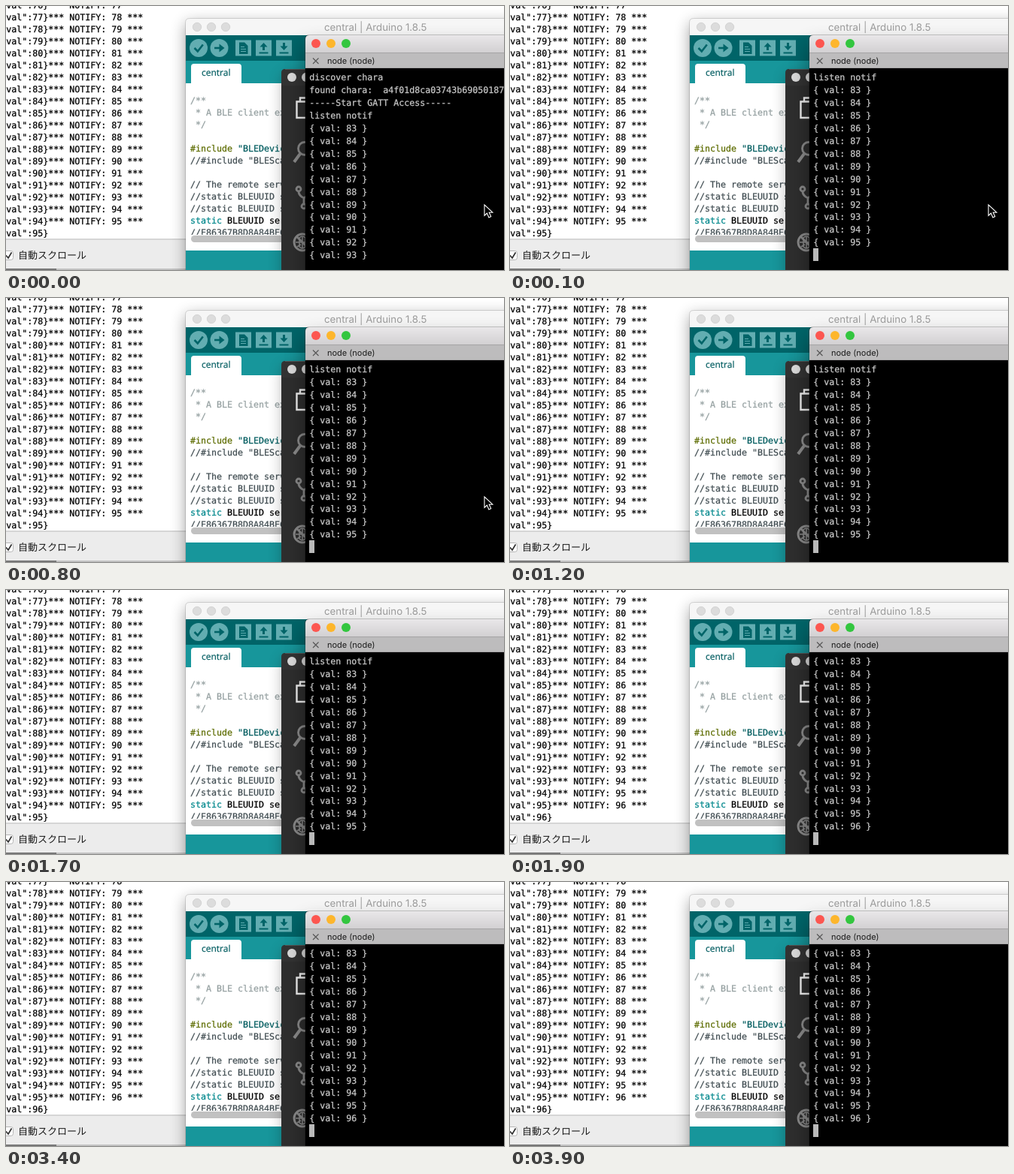
Recreate the animation shown at these times as an HTML page. Size 662 by 352 pixels, loop 4 s.

```html
<!DOCTYPE html>
<html lang="ja">
<head>
<meta charset="utf-8">
<title>BLE notify demo</title>
<style>
html, body { margin: 0; width: 100%; height: 100%; overflow: hidden; background: #fff; }
svg { display: block; }
text { white-space: pre; text-rendering: geometricPrecision; }
.mono { font: 11.63px "DejaVu Sans Mono", monospace; stroke-width: .25; }
.ui { font-family: Inter, sans-serif; }
</style>
</head>
<body>
<svg width="662" height="352" viewBox="0 0 662 352">
  <defs>
    <linearGradient id="bar" x2="0" y2="1">
      <stop stop-color="#e9e7e9"/><stop offset="1" stop-color="#d2d0d2"/>
    </linearGradient>
    <filter id="soft" x="-20%" y="-20%" width="140%" height="140%"><feGaussianBlur stdDeviation="10"/></filter>
    <filter id="deep" x="-30%" y="-30%" width="160%" height="160%"><feGaussianBlur stdDeviation="14"/></filter>
    <clipPath id="page"><rect x="239" y="103" width="127" height="202"/></clipPath>
    <clipPath id="side"><rect x="366" y="84" width="32" height="268"/></clipPath>
  </defs>

  <!-- serial monitor -->
  <rect width="662" height="352" fill="#fff"/>
  <g id="log" class="mono" fill="#000" stroke="#000"></g>
  <rect y="310" width="240" height="42" fill="#ececec"/>
  <path d="M0 311H240" stroke="#c0c0c0"/>
  <rect x="-3.500" y="326.500" width="13" height="12" rx="3" fill="#fff" stroke="#b5b5b5"/>
  <path d="M0 332.500L3 336L7.500 328.500" fill="none" stroke="#333" stroke-width="1.700"/>
  <text x="16" y="337" font-size="13" fill="#1c1c1c" font-family="'Noto Sans CJK JP','Noto Sans CJK',sans-serif">自動スクロール</text>
  <rect y="350" width="240" height="2" fill="#c2c2c2"/>
  <rect y="350" width="67" height="2" fill="#777"/>

  <!-- editor window -->
  <rect x="239" y="23" width="440" height="345" fill="#000" opacity=".38" filter="url(#soft)"/>
  <path d="M239 352V22q0-5 5-5H662V352z" fill="#f6f6f6"/>
  <path d="M238.500 352V22q0-5.500 5.500-5.500H662" fill="none" stroke="#000" stroke-opacity=".12"/>
  <g fill="#dcdcdc" stroke="#cacaca" stroke-width=".7">
    <circle cx="254" cy="28" r="5.700"/><circle cx="273" cy="28" r="5.700"/><circle cx="292" cy="28" r="5.700"/>
  </g>
  <text class="ui" x="423" y="33" font-size="13.300" fill="#9c9c9c">central | Arduino 1.8.5</text>
  <rect x="239" y="39" width="423" height="34" fill="#006468"/>
  <g fill="#62adb1">
    <circle cx="256" cy="56" r="12"/><circle cx="283.500" cy="56" r="12"/>
    <path d="M305 45.500h21v21h-21zM332 45.500h21v21h-21zM359 45.500h21v21h-21z"/>
  </g>
  <g fill="none" stroke="#006468" stroke-width="2.600">
    <path d="M250.500 56l4.300 4.500l7-9"/>
    <path d="M277 56h8"/>
  </g>
  <g fill="#006468">
    <path d="M283.500 50.500l7 5.500l-7 5.500z"/>
    <path d="M310 48.500h7l4.500 4.500v11h-11.500z"/>
    <path d="M341 59v-4.500h-3.500l5-5.500l5 5.500h-3.500v4.500zM336.500 61.500h12v2h-12z"/>
    <path d="M368 49v4.500h-3.500l5 5.500l5-5.500h-3.500v-4.500zM363.500 61.500h12v2h-12z"/>
  </g>
  <path d="M312 54.500h5M312 57.500h7M312 60.500h7" stroke="#62adb1"/>
  <rect x="239" y="73" width="423" height="30" fill="#17969b"/>
  <path d="M246 103V81q0-4 4-4H309q4 0 4 4V103z" fill="#fff"/>
  <text x="260" y="93" font-size="12" fill="#005c60" stroke="#005c60" stroke-width=".2" font-family="'Open Sans',sans-serif">central</text>
  <rect x="239" y="103" width="130" height="223" fill="#fff"/>
  <g id="code" class="mono" clip-path="url(#page)"></g>
  <rect x="246" y="306" width="140" height="9" rx="4.500" fill="#c1c1c1"/>
  <rect x="239" y="326" width="130" height="26" fill="#17969b"/>

  <!-- dark editor edge -->
  <rect x="368" y="92" width="300" height="300" fill="#000" opacity=".3" filter="url(#soft)"/>
  <path d="M366 352V89q0-5 5-5H400V352z" fill="#333"/>
  <path d="M371 84.500H398" stroke="#555"/>
  <g clip-path="url(#side)">
    <rect x="366" y="106" width="32" height="246" fill="#2e2e2e"/>
    <circle cx="380" cy="95" r="6" fill="#dadada"/><circle cx="399" cy="95" r="6" fill="#dadada"/>
    <path d="M399 127.500H386.500V149H399M391 127v-4.500h8" fill="none" stroke="#f0f0f0" stroke-width="2.400"/>
    <g fill="none" stroke="#8a8a8a" stroke-width="2.800">
      <circle cx="397" cy="190" r="8.500"/><path d="M391 197L383 208" stroke-width="4"/>
      <circle cx="389" cy="244" r="3"/><circle cx="396" cy="267" r="3"/>
      <path d="M389 247q0 6 7 9v8M396 256q6-3 7-9"/>
      <circle cx="394" cy="315" r="11"/><path d="M386 307L402 323"/>
      <path d="M390 309q4-4 8 0v12q-4 4-8 0zM385 315h14M387 321l5-3M394 308v15" stroke-width="1.500"/>
    </g>
  </g>

  <!-- terminal -->
  <rect x="398" y="54" width="300" height="330" fill="#000" opacity=".42" filter="url(#deep)"/>
  <path d="M398 352V44q0-5 5-5H662V352z" fill="#000"/>
  <path d="M398 62V44q0-5 5-5H662V62z" fill="url(#bar)"/>
  <path d="M397.500 352V44q0-5.500 5.500-5.500H662" fill="none" stroke="#000" stroke-opacity=".2"/>
  <circle cx="412" cy="50" r="6" fill="#fc5650"/>
  <circle cx="432" cy="50" r="6" fill="#fdb62c"/>
  <circle cx="452" cy="50" r="6" fill="#33c63f"/>
  <rect x="398" y="62" width="264" height="21" fill="#bdbcbd"/>
  <path d="M398 62.500H662M398 82.500H662" stroke="#a5a4a5"/>
  <path d="M408 69.500l7.500 7.500m0-7.500l-7.500 7.500" stroke="#555" stroke-width="1.100"/>
  <text class="ui" x="427" y="77" font-size="11" fill="#1c1c1c">node (node)</text>
  <g id="term" class="mono" fill="#cacaca" stroke="#cacaca"></g>
  <rect id="caret" x="403" y="323" width="7" height="17" fill="#b9b9b9"/>
  <path id="pointer" d="M636 265v14.500l3.400-3.200l2.500 5.700l2.800-1.200l-2.500-5.600h4.600z" fill="#000" stroke="#fff" stroke-width="1.100"/>
</svg>
<script>
const $ = id => document.getElementById(id);
const NS = "http://www.w3.org/2000/svg";

function line(group, x, y) {
  const el = document.createElementNS(NS, "text");
  el.setAttribute("x", x);
  el.setAttribute("y", y);
  group.appendChild(el);
  return el;
}

function show(id, on) {
  $(id).setAttribute("visibility", on ? "visible" : "hidden");
}

const grey = "#95a0a1", slate = "#434f54";
const code = [
  [["/**", grey]],
  [[" * A BLE client example", grey]],
  [[" */", grey]],
  [],
  [["#include ", "#5e6d03"], ["\"BLEDevice.h\"", "#005c5f"]],
  [["//#include \"BLEScan.h\"", slate]],
  [],
  [["// The remote service", slate]],
  [["//static BLEUUID serv", slate]],
  [["//static BLEUUID serv", slate]],
  [["static ", "#00878c"], ["BLEUUID serv", "#000"]],
  [["//E86367B8D8A84BEC", slate]]
];
code.forEach((parts, i) => {
  const row = line($("code"), 245, 130 + 16 * i);
  for (const [str, color] of parts) {
    const span = document.createElementNS(NS, "tspan");
    span.textContent = str;
    span.setAttribute("fill", color);
    span.setAttribute("stroke", color);
    row.appendChild(span);
  }
});

const LOG = 20, ROWS = 15, LOOP = 4000, POINTER_END = 1000;
const logRows = Array.from({ length: LOG }, (_, i) => line($("log"), 0.2, 307 - 16 * (LOG - 1 - i)));
const termRows = Array.from({ length: ROWS }, (_, i) => line($("term"), 403.2, 99.2 + 16.93 * i));

const output = ["discover chara", "found chara:  a4f01d8ca03743b69050187", "-----Start GATT Access-----", "listen notif"];
for (let v = 83; v <= 96; v++) output.push(`{ val: ${v} }`);

// time, log counter, first terminal line, last terminal value
const steps = [
  { at: 0, log: 95, top: 0, last: 93 },
  { at: 100, log: 95, top: 3, last: 95 },
  { at: 1900, log: 96, top: 4, last: 96 }
];
let shown;

function draw(t) {
  show("pointer", t < POINTER_END);
  const s = steps.filter(p => p.at <= t).pop();
  if (s === shown) return;
  shown = s;
  logRows.forEach((row, i) => {
    const v = s.log - LOG + 1 + i;
    row.textContent = `val":${v}}` + (v < s.log ? `*** NOTIFY: ${v + 1} ***` : "");
  });
  const seen = output.slice(s.top, s.last - 78);
  termRows.forEach((row, i) => { row.textContent = seen[i] || ""; });
  show("caret", seen.length < ROWS);
}

const start = performance.now();
function tick() {
  draw((performance.now() - start) % LOOP);
  requestAnimationFrame(tick);
}
draw(0);
requestAnimationFrame(tick);
</script>
</body>
</html>
```
